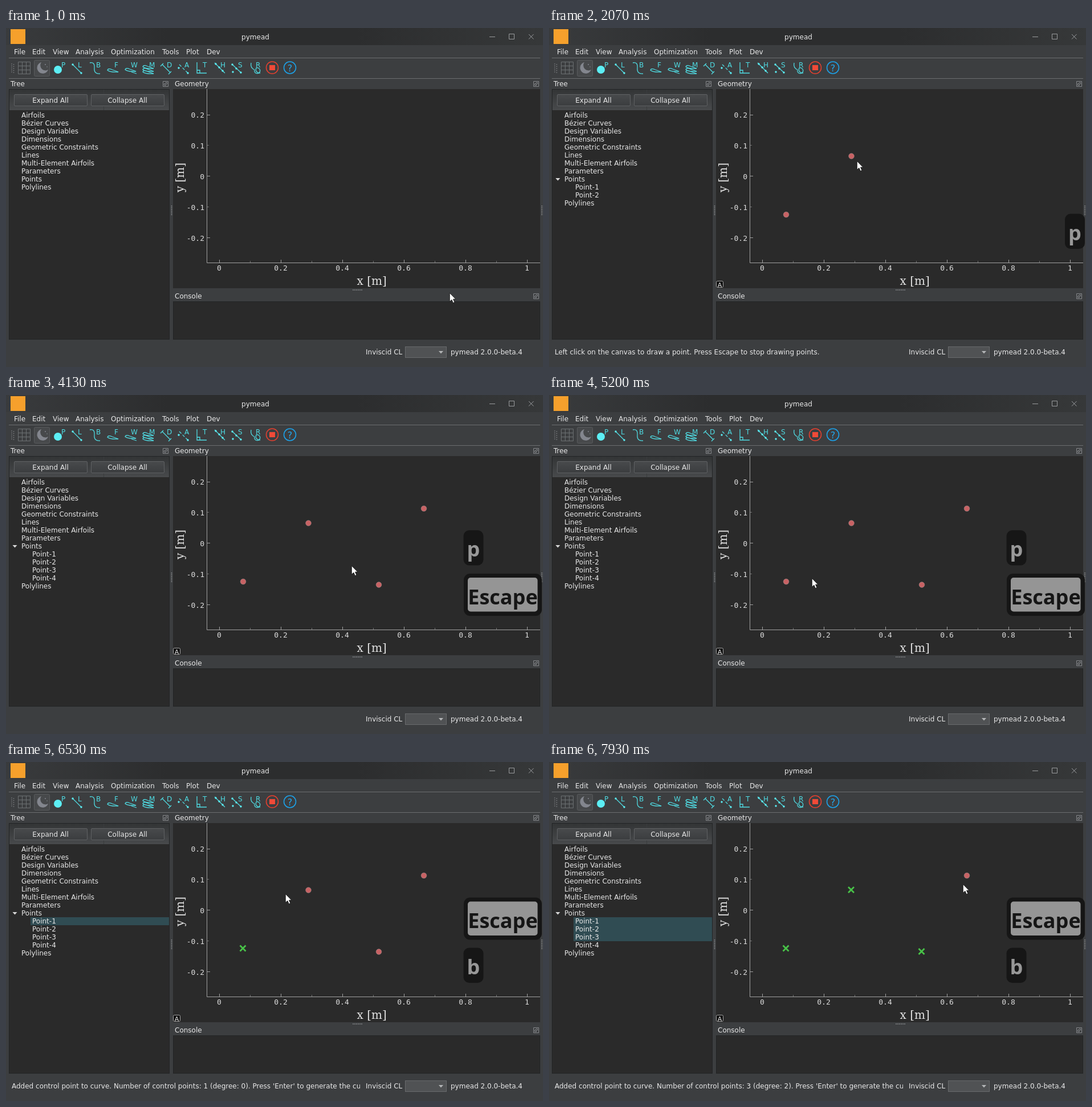
Animation of 942 by 594 pixels, one loop 8000 ms. Source, as an HTML page:

```html
<!DOCTYPE html>
<html lang="en">
<head>
<meta charset="utf-8">
<title>pymead</title>
<style>
html, body { margin: 0; width: 100%; height: 100%; overflow: hidden; background: #3c3e40; }
svg { display: block; width: 942px; height: 594px; }
text { font: 12px "DejaVu Sans", sans-serif; fill: #e8e8e8; white-space: pre; }
.tick { font: 13px "DejaVu Sans Mono", monospace; fill: #dcdcdc; }
.axis { font: 20px "DejaVu Serif", serif; fill: #e2e2e2; }
.key { font: bold 36px "Noto Sans", sans-serif; }
.mid { text-anchor: middle; }
.icon text { fill: #4fdbe2; }
.icon path { fill: none; stroke: #4fdbe2; stroke-width: 1.3; }
</style>
</head>
<body>
<svg id="stage" viewBox="0 0 942 594">
  <defs>
    <linearGradient id="bar">
      <stop offset="0" stop-color="#393b3d"/><stop offset=".3" stop-color="#2c2d2e"/>
      <stop offset=".65" stop-color="#2c2d2e"/><stop offset="1" stop-color="#363839"/>
    </linearGradient>
    <linearGradient id="head" x2="0" y2="1">
      <stop offset="0" stop-color="#333536"/><stop offset="1" stop-color="#484a4c"/>
    </linearGradient>
    <linearGradient id="button" x2="0" y2="1">
      <stop offset="0" stop-color="#484a4c"/><stop offset="1" stop-color="#3b3d3f"/>
    </linearGradient>
    <clipPath id="statusClip"><rect x="8" y="555" width="613" height="28"/></clipPath>
  </defs>
  <g id="base"></g>
  <g id="tree"></g>
  <g id="marks"></g>
  <g id="auto">
    <rect x="293.5" y="443.5" width="12" height="11" rx="2" fill="#0c0c0c" stroke="#a8a8a8"/>
    <text x="299.5" y="453.5" class="mid" style="font-size:11px">A</text>
  </g>
  <g id="keys"></g>
  <text id="status" x="10" y="572" clip-path="url(#statusClip)"></text>
  <path id="cursor" d="M0 0V15L3.6 11.8L6 17.3L8.6 16.2L6.2 10.8H10.5Z" fill="#fff" stroke="#111" stroke-width=".8"/>
</svg>
<script>
const LOOP = 8000, FPS = 15;
const $ = id => document.getElementById(id);

const text = (x, y, s, attrs = '') => `<text x="${x}" y="${y}" ${attrs}>${s}</text>`;
const rect = (x, y, w, h, fill, attrs = '') =>
  `<rect x="${x}" y="${y}" width="${w}" height="${h}" fill="${fill}" ${attrs}/>`;
const line = (d, stroke, attrs = '') => `<path d="${d}" fill="none" stroke="${stroke}" ${attrs}/>`;
const dot = (x, y, r, fill, attrs = '') => `<circle cx="${x}" cy="${y}" r="${r}" fill="${fill}" ${attrs}/>`;
const range = n => [...Array(n).keys()];

function windowFrame() {
  const menus = [['File', 14], ['Edit', 46], ['View', 82], ['Analysis', 122], ['Optimization', 184],
    ['Tools', 274], ['Plot', 316], ['Dev', 352]];
  return rect(0, 0, 942, 594, '#3c3e40') + rect(0, 0, 942, 30, 'url(#bar)') +
    rect(8, 2, 26, 26, '#f6a02c') +
    text(437.5, 20, 'pymead', 'class="mid"') +
    line('M848 15.5H858M882.500 10.500h9v9h-9zM917 11l8.500 8.500M925.500 11l-8.500 8.500', '#9a9c9e') +
    menus.map(([s, x]) => text(x, 46, s)).join('') +
    line('M5 52.500H937M5 88.500H937', '#6c6e70');
}

function toolbar() {
  const cyan = '#5ceef4';
  const glyphs = [['P', 97], ['L', 126], ['B', 158], ['F', 190], ['W', 219], ['M', 251], ['D', 282],
    ['A', 313], ['T', 345], ['H', 376], ['S', 407], ['R', 438]];
  const foil = (x, y) => `M${x} ${y}q1 -4 8 -1l11 4q-14 1 -19 -3z`;
  const beads = pts => pts.map(([x, y]) => dot(x, y, 1.7, cyan)).join('');
  const grip = range(5).map(i => dot(10, 63 + i * 3.5, .8, '#8c8e90') + dot(13.5, 64 + i * 3.5, .8, '#8c8e90')).join('');
  return grip +
    line('M21.500 59.500h21v21h-21zM28.500 59v22M35.500 59v22M21 66.500h22M21 73.500h22', '#6c7072') +
    rect(49.5, 56.5, 27, 28, '#47494b', 'rx="2" stroke="#595b5d"') +
    '<path d="M62 60A10 10 0 1 0 74 73A9 9 0 0 1 62 60z" fill="#83868e"/>' +
    dot(69, 64, 1, '#83868e') + dot(72, 68, .8, '#83868e') +
    `<g class="icon">${dot(91, 73, 7, cyan)}
    <path d="M117 64L132 79M147 61Q156 59 155 70T165 80"/>
    <path d="${foil(178, 74)}${foil(209, 73)}M220 77l9 3${foil(240, 68)}${foil(240, 73)}${foil(240, 77)}"/>
    <path d="M274 64l14 14M271 67l5 -5M285 81l5 -5M335 60V79H352M335 74h5v5"/>
    <path d="M304 64l15 15" stroke-dasharray="5 3"/>
    <path d="M366 61L384 79M397 64L412 78"/>
    <path d="M430 61q-2 9 6 12M436 73a5 5 0 1 0 3 -3q-3 8 7 9"/>
    ${beads([[117, 64], [132, 79], [303, 70], [319, 79], [368, 63], [374, 69], [380, 75],
      [397, 64], [404, 71], [412, 78], [398, 77]])}
    ${glyphs.map(([s, x]) => text(x, 69, s)).join('')}</g>` +
    dot(467, 69.5, 10.5, 'none', 'stroke="#e8402f" stroke-width="1.5"') + rect(462, 65, 10, 9, '#f04a38') +
    dot(498, 69.5, 10.5, 'none', 'stroke="#1da0e6" stroke-width="1.6"') +
    text(498, 75.5, '?', 'class="mid" style="font-size:16px;fill:#22a8ee"');
}

function docks() {
  const floater = (x, y) => line(`M${x}.5 ${y}.5h9v9h-9zM${x + 2}.5 ${y + 4}.5h3v3h-3zM${x + 4}.5 ${y + 2}.5h3v3`, '#85878a');
  const button = (x, s) => rect(x + .5, 116.5, 128, 20, 'url(#button)', 'rx="1.5" stroke="#5f6163"') +
    text(x + 64, 131, s, 'class="mid"');
  const grips = range(6).map(i => dot(290.5, 312 + i * 3, .9, '#8b8d8f') +
    dot(940, 312 + i * 3, .9, '#8b8d8f') + dot(609 + i * 3, 459, .9, '#8b8d8f')).join('');
  return text(8, 102, 'Tree') + text(296, 102, 'Geometry') + text(296, 474, 'Console') +
    floater(275, 93) + floater(925, 93) + floater(925, 465) +
    rect(5.5, 107.5, 281, 438, '#2a2a2a', 'stroke="#222425"') +
    rect(6, 108, 280, 36, 'url(#head)') + line('M171.500 108V144', '#3a3c3e') +
    button(14, 'Expand All') + button(149, 'Collapse All') +
    rect(293, 107, 644, 349, '#2a2a2a') +
    rect(293.5, 479.5, 643, 66, '#2a2a2a', 'stroke="#222425"') + grips +
    text(631, 572, 'Inviscid CL') + text(780, 572, 'pymead 2.0.0-beta.4') +
    rect(700.5, 558.5, 72, 19, '#505254', 'stroke="#686a6c"') +
    '<path d="M759 566h8l-4 4.500z" fill="#b4b6b8"/>';
}

function axes() {
  let s = line('M352.500 107V411.500H937', '#a0a0a0');
  range(5).forEach(i => {
    const y = 152 + i * 53.9, yLine = Math.floor(y) + .5;
    s += text(348, y + 5, ['0.2', '0.1', '0', '-0.1', '-0.2'][i], 'class="tick" text-anchor="end"');
    s += line(`M353 ${yLine}h${i % 2 ? 3 : 5}`, i % 2 ? '#707070' : '#a0a0a0');
  });
  range(11).forEach(i => {
    const x = 374 + i * 54, minor = i % 2;
    s += line(`M${x + .5} 411v${minor ? -3 : -5}`, minor ? '#707070' : '#a0a0a0');
    if (!minor) s += text(x, 425, i / 10, 'class="tick mid"');
  });
  return s + text(641.7, 450, 'x [m]', 'class="axis mid"') +
    text(0, 0, 'y [m]', 'class="axis mid" transform="translate(312 262) rotate(-90)"');
}

// All times below are counted in steps of 1/15 s.
const POINTS = [[416, 327], [530.5, 224.5], [654, 332.5], [733, 199]];
const ADDED = [20, 29, 37, 44], PICKED = [94, 103, 112];
const P_DOWN = 10, ESC = 61, B_DOWN = 86, P_GONE = 89;
const PATH = [
  [0, 778, 464], [4, 548, 293], [9, 548, 293], [19, 416, 328], [22, 416, 328], [28, 531, 225],
  [30, 531, 225], [36, 654, 333], [37, 654, 333], [41, 738, 186], [43, 734, 200], [44, 734, 200],
  [48, 788, 161], [56, 607, 298], [57, 607, 298], [58, 606, 299], [62, 606, 299], [68, 557, 307],
  [70, 557, 307], [78, 461, 321], [83, 449, 319], [85, 449, 319], [91, 416, 328], [94, 416, 328],
  [98, 490, 231], [101, 515, 186], [103, 531, 225], [106, 629, 294], [110, 654, 333],
  [112, 654, 333], [119, 726, 214]
];
const count = (times, step) => times.filter(t => step >= t).length;

function cursorAt(step) {
  const i = PATH.findIndex(p => p[0] >= step);
  if (i < 1) return PATH[i ? PATH.length - 1 : 0].slice(1);
  const [t0, x0, y0] = PATH[i - 1], [t1, x1, y1] = PATH[i];
  const u = (step - t0) / (t1 - t0), k = u * u * (3 - 2 * u);
  return [x0 + (x1 - x0) * k, y0 + (y1 - y0) * k];
}

function treeRows(added, picked) {
  const rows = ['Airfoils', 'Bézier Curves', 'Design Variables', 'Dimensions', 'Geometric Constraints',
    'Lines', 'Multi-Element Airfoils', 'Parameters', 'Points',
    ...range(added).map(i => `Point-${i + 1}`), 'Polylines'];
  const shade = picked ? rect(43, 272, 243, picked * 14, '#304c53') : '';
  const arrow = added ? '<path d="M11.500 263h8l-4 4.500z" fill="#d8d8d8"/>' : '';
  return shade + arrow + rows.map((s, i) =>
    text(i > 8 && i <= 8 + added ? 46 : 27, 157 + i * 14, s)).join('');
}

function markers(added, picked) {
  return POINTS.slice(0, added).map(([x, y], i) => i < picked
    ? line(`M${x - 5.5} ${y - 5.5}l10 10m0 -10l-10 10`, '#48c248', 'stroke-width="2.8"')
    : dot(x, y, 4.8, '#c86264', 'stroke="#a89090" stroke-width=".6"')).join('');
}

function letterKey(x, y, s) {
  return rect(x, y, 35, 61.5, '#161616', 'rx="10"') +
    text(x + 17.5, y + 46, s, 'class="key mid" style="fill:#989898"');
}
function escapeKey(y) {
  return rect(803, y, 137, 74, '#161616', 'rx="11"') + rect(810, y + 7, 122.5, 59.5, '#959595', 'rx="5"') +
    text(871.5, y + 53.7, 'Escape', 'class="key mid" style="fill:#161616"');
}
function keyStack(step) {
  if (step < P_DOWN) return '';
  if (step < ESC) return letterKey(905, 325.5, 'p');
  if (step < B_DOWN) return letterKey(802.5, 237, 'p') + escapeKey(313);
  return (step < P_GONE ? letterKey(802.5, 161.5, 'p') : '') + escapeKey(237.5) + letterKey(802.5, 325.5, 'b');
}

function statusText(step, picked) {
  if (picked) return `Added control point to curve. Number of control points: ${picked} (degree: ${picked - 1}). ` +
    "Press 'Enter' to generate the curve.";
  if (step >= B_DOWN) return 'Select the first Bézier control point of the curve';
  return step >= P_DOWN && step < ESC
    ? 'Left click on the canvas to draw a point. Press Escape to stop drawing points.' : '';
}

function render(ms) {
  // The small lead absorbs step times rounded to 10 ms.
  const step = Math.floor(ms * FPS / 1000 + .1);
  const added = count(ADDED, step), picked = count(PICKED, step);
  $('tree').innerHTML = treeRows(added, picked);
  $('marks').innerHTML = markers(added, picked);
  $('keys').innerHTML = keyStack(step);
  $('status').textContent = statusText(step, picked);
  $('auto').style.display = step > 0 ? '' : 'none';
  $('cursor').setAttribute('transform', `translate(${cursorAt(step).map(v => Math.round(v) + .3)})`);
}

$('base').innerHTML = windowFrame() + toolbar() + docks() + axes();
const start = performance.now();
function tick() {
  render((performance.now() - start) % LOOP);
  requestAnimationFrame(tick);
}
tick();
</script>
</body>
</html>
```
